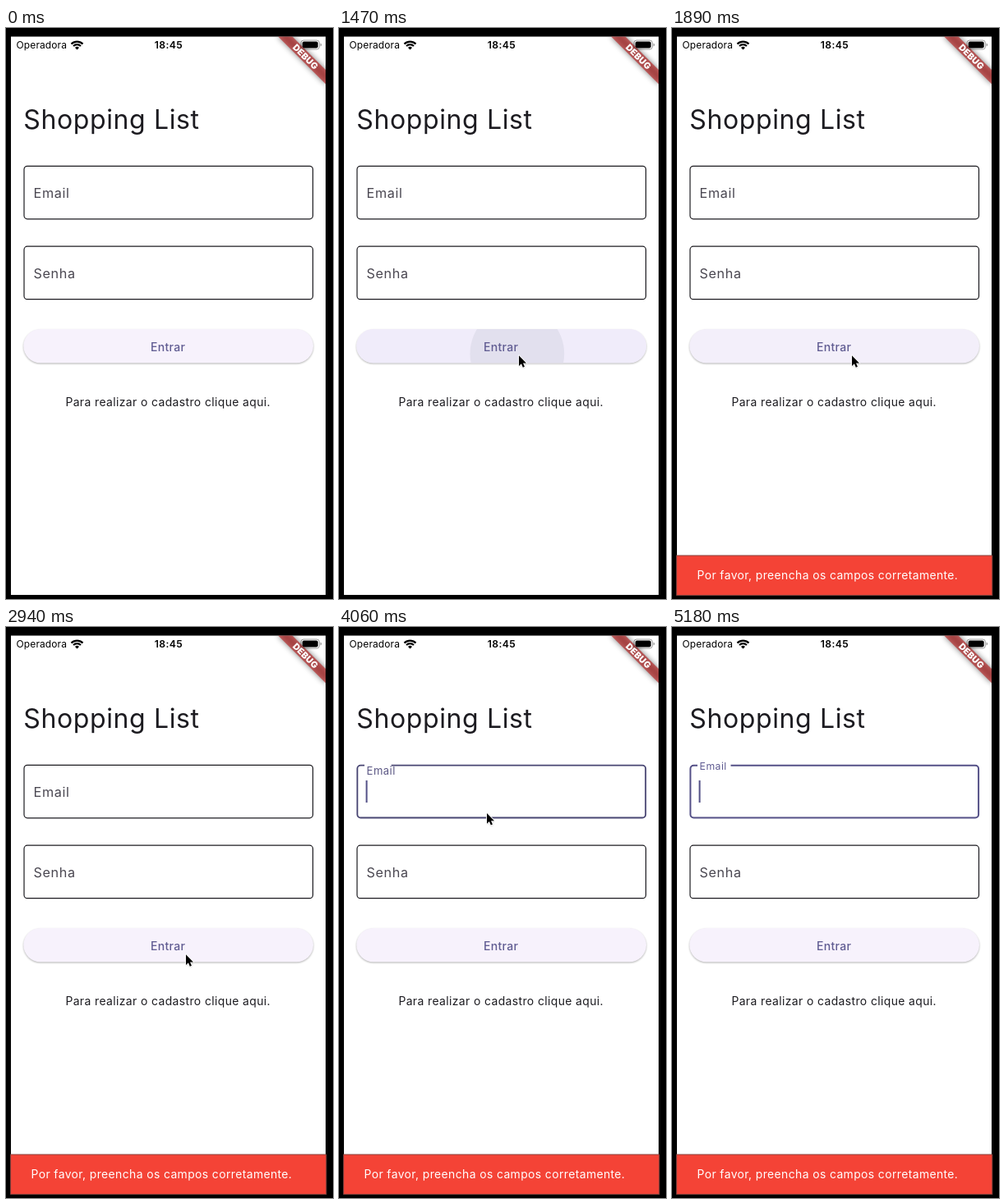
Write an HTML page that moves like this. It is 398 px wide and 696 px high and loops after 5.6 s.

```html
<!DOCTYPE html>
<html lang="pt">
<head>
<meta charset="utf-8">
<title>Login</title>
<style>
  html, body { margin: 0; width: 100%; height: 100%; overflow: hidden; background: #000; }
  svg { display: block; width: 100vw; height: 100vh; }
  text { font-family: Inter, "Noto Sans", sans-serif; font-optical-sizing: none; fill: #1c1b20; white-space: pre; }
  .title { font-size: 32px; letter-spacing: .62px; }
  .label { font-size: 16.2px; letter-spacing: .6px; fill: #4a4751; }
  .body { font-size: 13.9px; letter-spacing: .4px; }
  .action { font-size: 14px; font-weight: 500; letter-spacing: .35px; fill: #605c92; }
  .status { font-size: 12px; letter-spacing: .1px; fill: #000; }
  .clock { font-size: 12.2px; font-weight: 600; letter-spacing: .4px; }
  .banner { font-size: 10.6px; font-weight: 900; letter-spacing: .15px; fill: #fff; text-anchor: middle; }
  .field { fill: none; stroke: #1c1b20; stroke-width: 1.2; }
</style>
</head>
<body>
<svg viewBox="0 0 398 696" preserveAspectRatio="none">
  <defs>
    <clipPath id="screen"><rect x="6" y="10.5" width="383" height="680.5"/></clipPath>
    <clipPath id="edge"><rect x="5" y="10" width="386" height="682"/></clipPath>
    <clipPath id="pill"><rect x="21.3" y="367" width="352.7" height="41.3" rx="20.6"/></clipPath>
    <filter id="soft" x="-20%" y="-100%" width="140%" height="300%"><feGaussianBlur stdDeviation="3.9"/></filter>
    <filter id="thin" x="-5%" y="-20%" width="110%" height="150%"><feGaussianBlur stdDeviation=".9"/></filter>
  </defs>
  <rect width="398" height="696"/>
  <g clip-path="url(#screen)">
    <rect x="6" y="10" width="383" height="682" fill="#fff"/>
    <text class="title" x="21.3" y="123">Shopping List</text>

    <rect id="box" class="field" rx="4"/>
    <rect id="gap" x="31" y="165" height="7" fill="#fff"/>
    <text id="email" class="label">Email</text>
    <rect id="caret" x="32.6" y="187" width="2" height="27" fill="#545087"/>

    <rect class="field" x="22" y="266.2" width="351.5" height="64.5" rx="4"/>
    <text class="label" x="33.6" y="304.8">Senha</text>

    <rect x="21.3" y="368.2" width="352.7" height="41" rx="20.5" opacity=".3" filter="url(#thin)"/>
    <g clip-path="url(#pill)">
      <rect x="21" y="366" width="354" height="44" fill="#f7f2fc"/>
      <rect id="press" x="21" y="366" width="354" height="44" fill="#f0ecfa"/>
      <circle id="ripple" fill="#e2e0ee"/>
    </g>
    <text class="action" x="175.9" y="393.5">Entrar</text>
    <text class="body" x="72.4" y="461">Para realizar o cadastro clique aqui.</text>

    <g transform="translate(389 10.5) scale(1.021) rotate(45)">
      <rect x="-40" y="28" width="80" height="12" opacity=".5" filter="url(#soft)"/>
      <rect x="-40" y="28" width="80" height="12" fill="#b71c1c" fill-opacity=".627"/>
      <text class="banner" x="0" y="37.8">DEBUG</text>
    </g>

    <text class="status" x="12.6" y="25.3">Operadora</text>
    <path d="M79.5 19.5a9.9 9.9 0 0 1 14 0M82 22a6.4 6.4 0 0 1 9 0" fill="none" stroke="#000" stroke-width="2.2"/>
    <path d="M86.5 26.5l-2.5-2.5a3.6 3.6 0 0 1 5 0z"/>
    <text class="status clock" x="180.7" y="25.3">18:45</text>
    <rect x="359" y="15" width="22.4" height="11" rx="3.2" fill="none" stroke="#000" stroke-opacity=".38"/>
    <rect x="360.7" y="16.6" width="19" height="7.8" rx="2"/>
    <path d="M382.6 18.6q1.5 .5 1.5 1.9t-1.5 1.9z" fill-opacity=".42"/>
  </g>
  <g clip-path="url(#edge)">
    <g id="snack">
      <rect x="5.6" y="643" width="384.2" height="48.4" fill="#f44336" stroke="#85443f"/>
      <text class="body" x="30.5" y="672" style="fill:#fff">Por favor, preencha os campos corretamente.</text>
    </g>
  </g>
  <g id="cursor">
    <path d="M0 1V14.5L3.2 11.6 5.2 16.2 7.6 15.2 5.6 10.8H9.8Z" opacity=".3" filter="url(#thin)"/>
    <path d="M0 0V13.4L3.1 10.5 5.1 15.2 7.3 14.2 5.3 9.7H9.5Z" stroke="#fff" stroke-width="1.8" stroke-linejoin="round" paint-order="stroke"/>
  </g>
</svg>
<script>
const LOOP = 5600, TICK = 70;
const ENTER = 490, LEAVE = 5180, CLICK = 1400, SNACK = 1477, FOCUS = 3960;

const $ = id => document.getElementById(id);
const set = (id, attrs) => {
  for (const k in attrs) $(id).setAttribute(k, attrs[k]);
};
const show = on => on ? 'visible' : 'hidden';
const clamp = v => Math.min(1, Math.max(0, v));
const mix = (a, b, p) => a + (b - a) * p;
const span = (t, from, to) => clamp((t - from) / (to - from));

const slowDown = p => 1 - (1 - p) ** 3;
const speedUp = p => p * p;
const smooth = p => p * p * (3 - 2 * p);

// cubic-bezier(.4, 0, .2, 1), solved by bisection
function material(x) {
  let lo = 0, hi = 1;
  for (let i = 0; i < 20; i++) {
    const s = (lo + hi) / 2, r = 1 - s;
    if (1.2 * r * r * s + .6 * r * s * s + s ** 3 < x) lo = s; else hi = s;
  }
  return 3 * (1 - lo) * lo * lo + lo ** 3;
}

// pointer trips: each starts where the last one ended
const trips = [
  { from: ENTER, to: 1260, x: 219, y: 399.2, ease: slowDown },
  { from: 2940, to: 3600, x: 169, y: 235, ease: smooth },
  { from: 3640, to: 3850, x: 179, y: 198, ease: smooth },
  { from: 3920, to: 4200, x: 181, y: 256, ease: smooth },
  { from: 4760, to: 5110, x: 259, y: 640, ease: speedUp }
];

function pointer(t) {
  let x = 179, y = 579;
  for (const trip of trips) {
    const p = trip.ease(span(t, trip.from, trip.to));
    x = mix(x, trip.x, p);
    y = mix(y, trip.y, p);
  }
  return `translate(${x} ${y}) scale(.95)`;
}

function drawButton(t) {
  const grow = Math.max(0, (t - CLICK) / 210);
  const drift = Math.min(1, grow * grow);
  set('ripple', {
    cx: mix(219, 199.5, drift),
    cy: mix(398, 389, drift),
    r: 172 * Math.min(grow, 1.3),
    opacity: 1 - span(t, CLICK + 210, CLICK + 560)
  });
  set('press', {
    opacity: span(t, CLICK - 70, CLICK + 70) * (1 - span(t, CLICK + 140, CLICK + 280))
  });
}

function drawEmail(t) {
  const focus = material(span(t, FOCUS, FOCUS + 190));
  const tint = (a, b) => `rgb(${a.map((v, i) => Math.round(mix(v, b[i], focus)))})`;
  const line = mix(1.2, 2, focus);
  set('box', {
    x: 21.4 + line / 2, y: 167.7 + line / 2,
    width: 352.7 - line, height: 65.7 - line,
    style: `stroke:${tint([28, 27, 32], [84, 80, 135])};stroke-width:${line}`
  });
  set('gap', { width: 40.5 * focus });
  set('email', {
    transform: `translate(33.6 ${mix(206.8, 173.7, focus)}) scale(${mix(1, .757, focus)})`,
    style: `fill:${tint([74, 71, 81], [96, 92, 146])}`
  });
  // one blink, darkest gap around 4735 ms
  set('caret', { opacity: t > FOCUS + 70 ? clamp((Math.abs(t - 4735) - 60) / 190) : 0 });
}

function draw(t) {
  set('cursor', { transform: pointer(t), visibility: show(t >= ENTER && t < LEAVE) });
  const rise = material(span(t, SNACK, SNACK + 250));
  set('snack', { transform: `translate(0 ${48 * (1 - rise)})`, visibility: show(t > SNACK) });
  drawButton(t);
  drawEmail(t);
}

const start = performance.now();
function tick() {
  const t = (performance.now() - start) % LOOP;
  draw(Math.floor(t / TICK) * TICK);
  requestAnimationFrame(tick);
}
tick();
</script>
</body>
</html>
```
